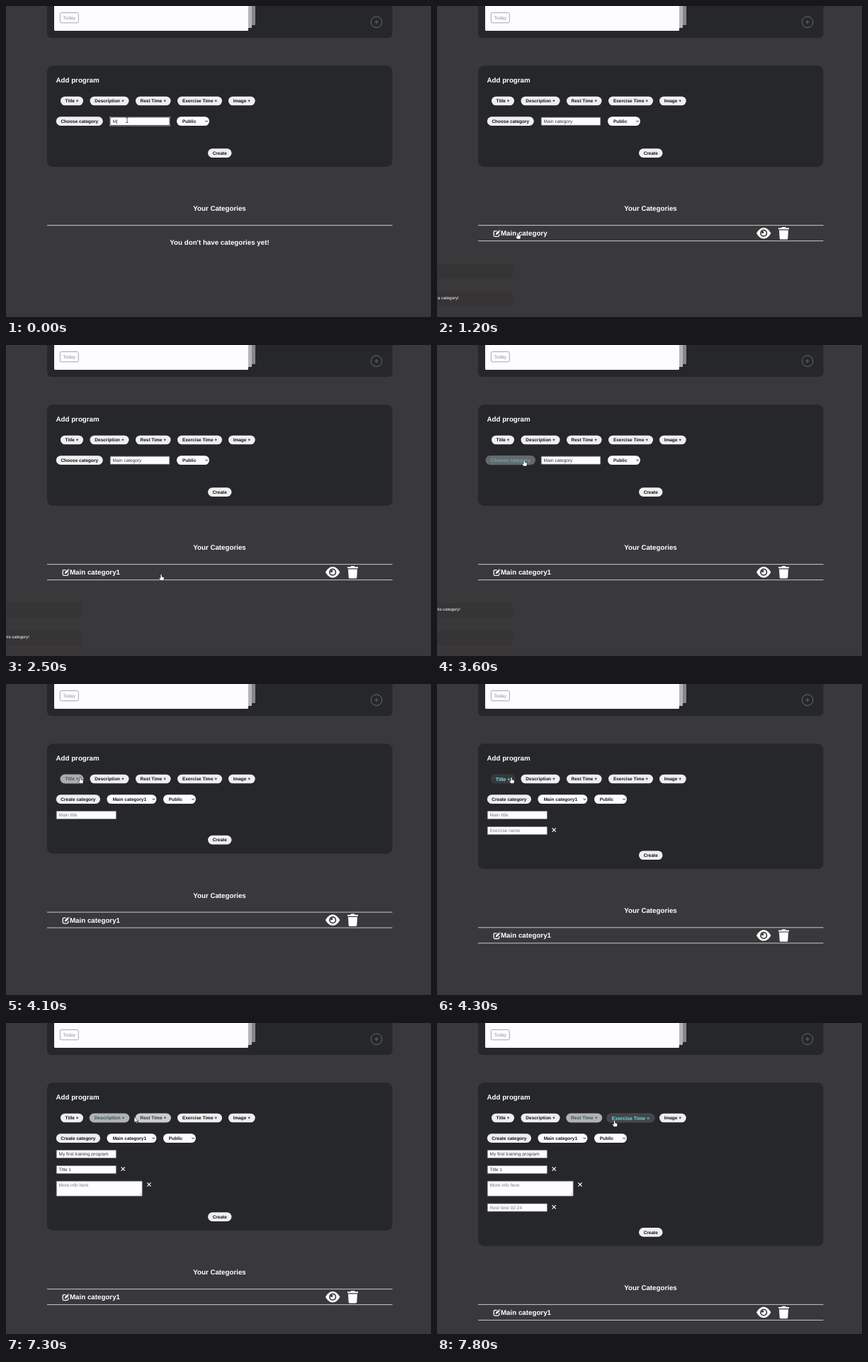
Animation, 600 px wide and 439 px high, one loop 8 s. Source, as an HTML page:

```html
<!DOCTYPE html>
<html lang="en">
<head>
<meta charset="utf-8">
<title>Add program</title>
<style>
  html, body { margin: 0; width: 100%; height: 100%; overflow: hidden; background: #39393c; }
  svg { display: block; width: 100%; height: 100%; }
  text { font: 6.5px "Liberation Sans", Arial, sans-serif; text-rendering: geometricPrecision; white-space: pre; }
  .b { font-weight: bold; }
  .h { font-weight: bold; font-size: 9.75px; fill: #fff; }
  .m { text-anchor: middle; }
</style>
</head>
<body>
<svg id="stage" viewBox="0 0 600 439"></svg>
<script>
const stage = document.getElementById('stage');
const LOOP = 8000, STEP = 100;
const clamp = (v, lo = 0, hi = 1) => Math.min(hi, Math.max(lo, v));
const during = (t, from, to) => t >= from && t < to;

const rect = (x, y, w, h, fill, r = 0, extra = '') =>
  `<rect x="${x}" y="${y}" width="${w}" height="${h}" rx="${r}" fill="${fill}" ${extra}/>`;
const text = (x, y, s, cls = '', fill = '') =>
  `<text x="${x}" y="${y}" class="${cls}" ${fill && `fill="${fill}"`}>${s}</text>`;
const line = (d, color = '#fff', w = 1) =>
  `<path d="${d}" fill="none" stroke="${color}" stroke-width="${w}"/>`;
const shape = (d, fill = '#fff', extra = '') => `<path d="${d}" fill="${fill}" ${extra}/>`;
const at = (x, y, s, scale = 1) => `<g transform="translate(${x} ${y}) scale(${scale})">${s}</g>`;
const mix = (a, b, k) => `rgb(${a.map((v, i) => Math.round(v + (b[i] - v) * k))})`;

// Hover windows per button: [start, end]
const hovers = {
  create: [800, 1000],
  category: [3400, 3850],
  title: [4000, 4500],
  description: [6950, 7200],
  rest: [7250, 7700],
  exercise: [7550, 9000]
};

function hoverAmount(t, id) {
  const win = hovers[id];
  return win ? clamp((t - win[0]) / 270) * (1 - clamp((t - win[1]) / 150)) : 0;
}

function button(t, id, x, cy, w, label) {
  const k = hoverAmount(t, id);
  return at(x + w / 2, cy,
    rect(-w / 2, -6.3, w, 12.6, mix([239, 239, 240], [57, 57, 60], k), 6.3) +
    text(0, 2.3, label, 'b m', mix([16, 16, 18], [112, 232, 240], k)), 1 + 0.09 * k);
}

function select(x, w, label, pad) {
  return rect(x, 156.2, w, 12.8, '#fdfcff', 6.4) + text(x + pad, 165, label, 'b', '#101012') +
    line(`M${x + w - 5.6} 161.8l1.7 1.7 1.7-1.7`, '#101012', 1);
}

function input(x, y, w, h, value, hint, focused) {
  const frame = focused
    ? rect(x - 1, y - 1, w + 2, h + 2, '#fff', 1.5) + rect(x - .2, y - .2, w + .4, h + .4, '#fdfcff', 1, 'stroke="#111" stroke-width="1"')
    : rect(x + .3, y + .3, w - .6, h - .6, '#fdfcff', .5, 'stroke="#85858a" stroke-width=".7"');
  const caret = focused ? '<tspan dx="-.5" fill="#111">|</tspan>' : '';
  return frame + (value || focused
    ? text(x + 3.5, y + 7.9, value + caret, '', '#333338')
    : text(x + 3.5, y + 7.9, hint, '', '#7b7b80'));
}

const cross = (x, y) => line(`M${x - 2.6} ${y - 2.6}l5.2 5.2m0-5.2l-5.2 5.2`, '#fff', 1.2);

const editIcon = at(79.5, 316,
  line('M5 1.7H2.2Q.7 1.7.7 3.2V7.8Q.7 9.3 2.2 9.3H6.8Q8.3 9.3 8.3 7.8V5.8', '#fff', 1.3) +
  shape('M3.2 7 3.7 4.7 7.3 1.1 9.1 2.9 5.5 6.5ZM7.8.6Q8.5-.1 9.2.5L9.8 1.1Q10.3 1.7 9.7 2.3Z'));

const eyeIcon = at(461.2, 320.7,
  shape('M-10.2 0C-7.2-5.2-3.7-7.7 0-7.7S7.2-5.2 10.2 0C7.2 5.2 3.7 7.7 0 7.7S-7.2 5.2-10.2 0Z') +
  '<circle r="5.1" fill="#39393c"/><circle r="3.4" fill="#fff"/><circle cx="-1.5" cy="-1.5" r="1.7" fill="#39393c"/>');

const trashIcon = at(482, 312,
  shape('M0 1.2H4.4L5 0H10L10.6 1.2H15V3.3H0ZM1 4.4H14L13.3 16Q13.2 17.5 11.7 17.5H3.3Q1.8 17.5 1.7 16Z'));

const backdrop =
  rect(0, 0, 600, 439, '#39393c') + rect(0, 434, 600, 5, '#3a3639') +
  rect(58, -20, 487.5, 65, '#26272b', 6) +
  rect(330, -5, 22, 32, '#87878b', 1) + rect(330, -5, 17, 36, '#b5b4b8', 1) +
  rect(68, -5, 274, 40, '#fdfcff', 1.5) +
  rect(76.3, 9.5, 26, 14.3, 'none', 2, 'stroke="#a0a8b6" stroke-width="1"') +
  text(89.3, 19, 'Today', 'm', '#8b8f9c') +
  '<circle cx="523" cy="22.7" r="7.8" fill="none" stroke="#6a6b70" stroke-width="1"/>' +
  line('M520.3 22.7h5.4M523 20v5.4', '#6a6b70', .9);

// [time, x, y, kind]; the kind holds until the next key
const pointerKeys = [
  [0, 171, 161, 'beam'], [600, 171, 161, 'arrow'], [900, 299, 206, 'hand'], [1000, 299, 206, 'arrow'],
  [1200, 114, 320, 'hand'], [1500, 114, 320, 'hand'], [1600, 84, 320, 'hand'], [1900, 84, 320, 'arrow'],
  [2300, 190, 322, 'hand'], [2500, 219, 323.5, 'hand'], [2700, 219, 323.5, 'arrow'], [3400, 123, 162, 'hand'],
  [3700, 123, 162, 'arrow'], [4100, 105, 131.5, 'hand'], [4400, 105, 131.5, 'arrow'], [4800, 119, 182, 'beam'],
  [6000, 119, 182, 'beam'], [6200, 119, 206, 'beam'], [6800, 119, 206, 'arrow'], [7000, 150, 132, 'hand'],
  [7200, 150, 132, 'arrow'], [7400, 212, 133, 'hand'], [7600, 212, 133, 'hand'], [7800, 250.5, 137.5, 'hand'],
  [8000, 250.5, 137.5, 'hand']
];

const pointers = {
  beam: line('M-1.6-3.5H1.6M0-3.5V3.5M-1.6 3.5H1.6', '#333', .8),
  hand: shape('M-1 .6Q0-.8 1 .6V3.4L3.7 4.2Q4.4 4.5 4.3 5.5L3.6 9H-.8L-3.2 5.6Q-2.8 4.4-1 5.6Z', '#fff', 'stroke="#111" stroke-width=".6"'),
  arrow: shape('M0 0V8.2L2 6.4 3.3 9.2 4.6 8.6 3.3 5.9H6Z', '#fff', 'stroke="#111" stroke-width=".6"')
};

function pointer(t) {
  const i = pointerKeys.findIndex(k => k[0] > t);
  const [t0, x0, y0, kind] = pointerKeys[i - 1], [t1, x1, y1] = pointerKeys[i];
  const k = (t - t0) / (t1 - t0), ease = k * k * (3 - 2 * k);
  return at(x0 + (x1 - x0) * ease, y0 + (y1 - y0) * ease, pointers[kind]);
}

function toasts(t) {
  if (!during(t, 1000, 4000)) return '';
  const first = t < 2300;
  const raised = first ? t >= 1800 : t >= 3000;
  const message = first ? 'You have created a category!' : 'You have changed this category!';
  return rect(0, 364, 107, 21, '#373436', 1) + rect(0, 403, 107, 21, '#373436', 1) +
    `<text x="${first ? 30.7 : 33}" y="${raised ? 375.2 : 414.2}" text-anchor="end" fill="#fff" style="font-size:6px">${message}</text>`;
}

function categoryList(t) {
  const rule = y => line(`M58 ${y}H545.5`, '#c9c9cb', 1);
  const head = text(301.5, 289, 'Your Categories', 'h m') + rule(309.6);
  if (t < 1000) return head + text(301.5, 337, "You don't have categories yet!", 'h m');
  const name = 'Main category' + (t >= 2100 ? '1' : '');
  const entry = during(t, 1800, 2300)
    ? input(79.5, 315, 84, 11.3, name, '', true)
    : editIcon + text(90, 324.1, name, 'h');
  return head + entry + eyeIcon + trashIcon + rule(331.6);
}

function program(t, grow) {
  const choosing = t >= 3700;
  const typed = (s, n) => s.slice(0, clamp(Math.ceil(n), 0, s.length));
  let out = rect(58, 84.3, 487.5, 142.6 + grow, '#26272b', 8) +
    text(70.5, 107.8, 'Add program', 'h') +
    button(t, 'title', 77, 134, 32, 'Title +') +
    button(t, 'description', 118.5, 134, 55, 'Description +') +
    button(t, 'rest', 183, 134, 49.5, 'Rest Time +') +
    button(t, 'exercise', 242, 134, 63, 'Exercise Time +') +
    button(t, 'image', 314, 134, 37.7, 'Image +') +
    button(t, 'create', 285, 207.6 + grow, 33.5, 'Create');

  if (!choosing) {
    return out + button(t, 'category', 70.8, 162.6, 66, 'Choose category') +
      input(147, 157, 84, 11.6, typed('Main category', 1 + t / 41), '', t < 900) +
      select(241, 46, 'Public', 8);
  }

  out += button(t, 'category', 70.8, 162.6, 62.2, 'Create category') +
    select(142.4, 70, 'Main category1', 8.3) + select(222, 46, 'Public', 7.7) +
    input(71, 179.3, 84.7, 11.5, typed('My first training program', (t - 4900) / 40), 'Main title', during(t, 4800, 6200));
  if (t >= 4200) {
    out += input(71, 201.2, 84.7, 11.5, typed('Title 1', (t - 6200) / 70), 'Exercise name', during(t, 6200, 6900)) +
      cross(165.2, 206);
  }
  if (t >= 7100) {
    out += input(71, 223, 121.5, 21.6, '', 'More info here', false) + cross(202, 228) +
      line('M188 243.3l3.2-3.2M190 243.3l1.2-1.2', '#88888c', .5);
  }
  if (t >= 7500) out += input(71, 254.8, 84.7, 11.5, '', 'Rest time 02:24', false) + cross(165.2, 259.8);
  return out;
}

function growth(t) {
  if (t < 3700) return 0;
  if (t < 4200) return 12.5;
  if (t < 7100) return 34.2;
  return t < 7500 ? 66 : 87.8;
}

function draw(t) {
  const grow = growth(t);
  stage.innerHTML = backdrop + program(t, grow) + at(0, grow, categoryList(t)) + toasts(t) + pointer(t);
}

const start = performance.now();
let shown = -1;
function tick() {
  const elapsed = Math.max(0, performance.now() - start) % LOOP;
  const t = Math.floor(elapsed / STEP) * STEP;
  if (t !== shown) draw(shown = t);
  requestAnimationFrame(tick);
}
tick();
</script>
</body>
</html>
```
